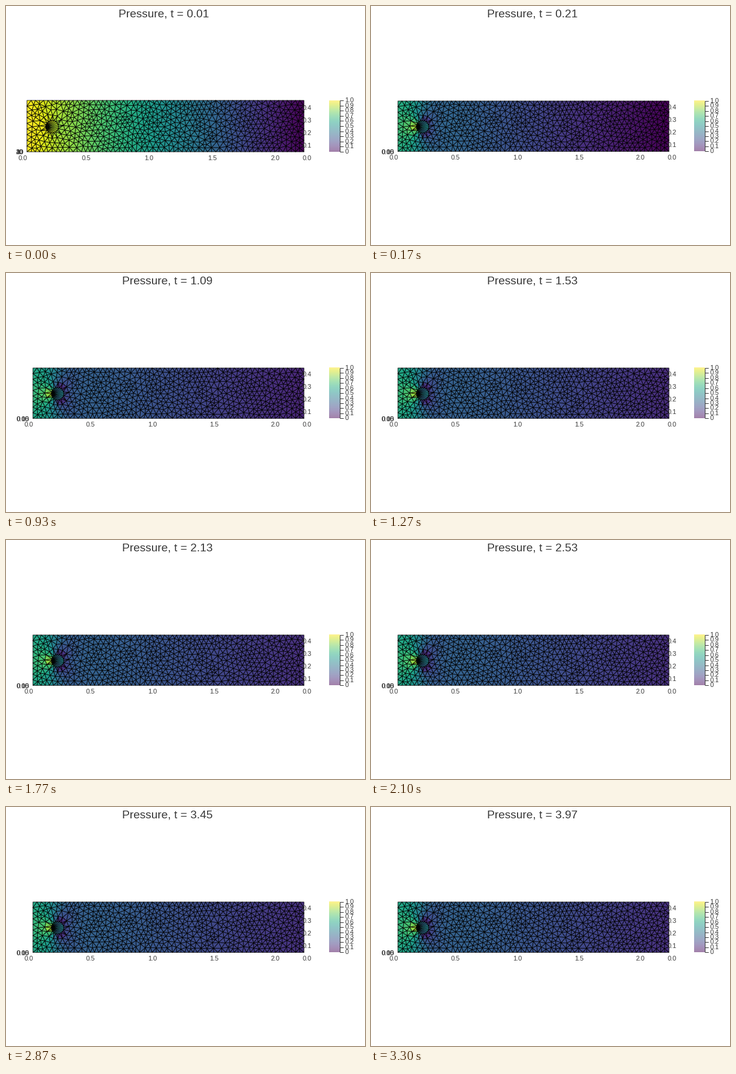
These frames come from a looping animation (600x400 px, 3330 ms). A matplotlib script:

```python
import numpy as np
import matplotlib.pyplot as plt
from matplotlib.animation import FuncAnimation
from matplotlib.collections import LineCollection, PolyCollection
from matplotlib.tri import Triangulation

W, H, DPI = 600, 400, 100
PX = 72 / DPI
FRAMES, LOOP_MS = 100, 3330
LENGTH, HEIGHT = 2.2, 0.41
CENTRE, RADIUS = np.array([0.2, 0.2]), 0.05
INK = "#383838"

plt.rcParams["font.family"] = "Liberation Sans"
viridis = plt.get_cmap("viridis")


def build_mesh(nx=66, ny=9, n_circle=20, gap=0.034, ring=0.042):
    """Unstructured channel mesh; the obstacle is closed by a fan of triangles."""
    rng = np.random.default_rng(4)
    angle = np.pi + 2 * np.pi * np.arange(n_circle) / n_circle
    circle = CENTRE + RADIUS * np.column_stack([np.cos(angle), np.sin(angle)])
    xs = np.linspace(0, LENGTH, nx + 1)
    ys = np.linspace(0, HEIGHT, ny + 1)[1:-1]
    border = np.concatenate([
        np.column_stack([xs, 0 * xs]),
        np.column_stack([xs, 0 * xs + HEIGHT]),
        np.column_stack([0 * ys, ys]),
        np.column_stack([0 * ys + LENGTH, ys]),
    ])
    fixed = np.concatenate([circle, border])

    # Dart throwing, then a little smoothing
    points = np.empty((9000, 2))
    count = len(fixed)
    points[:count] = fixed
    margin = 0.6 * gap
    darts = rng.uniform([margin, margin],
                        [LENGTH - margin, HEIGHT - margin], (8000, 2))
    for dart in darts:
        if np.hypot(*(dart - CENTRE)) < RADIUS + ring:
            continue
        offset = points[:count] - dart
        if np.min(np.einsum("ij,ij->i", offset, offset)) > (0.87 * gap) ** 2:
            points[count] = dart
            count += 1
    points = points[:count]

    for _ in range(3):
        edges = Triangulation(*points.T).edges
        total = np.zeros_like(points)
        degree = np.zeros(count)
        for a, b in (edges.T, edges.T[::-1]):
            np.add.at(total, a, points[b])
            np.add.at(degree, a, 1)
        moved = 0.4 * points + 0.6 * total / degree[:, None]
        reach = moved - CENTRE
        dist = np.hypot(*reach.T)
        near = dist < RADIUS + ring
        moved[near] = CENTRE + reach[near] / dist[near, None] * (RADIUS + ring)
        points[len(fixed):] = moved[len(fixed):]

    tris = Triangulation(*points.T).triangles
    tris = tris[(tris >= n_circle).any(axis=1)]
    fan = [(0, i, i + 1) for i in range(1, n_circle - 1)]
    return points, np.concatenate([tris, fan])


points, tris = build_mesh()
px, py = points.T
rel = points - CENTRE
dist = np.maximum(np.hypot(*rel.T), RADIUS)
cos = rel[:, 0] / dist
near = (RADIUS / dist) ** 1.3


def pressure(k):
    """Normalised pressure at the mesh points for step k."""
    if k == 0:
        p = 1 - px / LENGTH - 0.05 * near * cos
    else:
        decay = np.exp(-(0.04 * k - 0.2) / 0.5)
        left = 0.55 + 0.10 * decay
        mid = 0.31 + 0.08 * decay
        right = 0.09 - 0.12 * decay
        upstream = left - 0.1 * px
        downstream = mid + (right - mid) * (px - 0.3) / (LENGTH - 0.3)
        s = np.clip((px - 0.08) / 0.24, 0, 1)
        s = s * s * (3 - 2 * s)
        cos2 = 2 * cos ** 2 - 1
        p = upstream + (downstream - upstream) * s
        p += near * (-0.13 - 0.36 * cos + 0.27 * cos2)
    return (p - p.min()) / (p.max() - p.min())


fig = plt.figure(figsize=(W / DPI, H / DPI), dpi=DPI, facecolor="white")
ax = fig.add_axes([0, 0, 1, 1])
ax.axis("off")


def label(text="", size=10.9, **kw):
    kw.setdefault("va", "center")
    return ax.text(0, 0, text, fontsize=size * PX, color=INK, **kw)


bar = ax.imshow(np.linspace(1, 0, 256)[:, None], cmap=viridis, alpha=0.5,
                aspect="auto", interpolation="bilinear")
ax.set_xlim(0, W)
ax.set_ylim(H, 0)

mesh = PolyCollection([], edgecolors="black", linewidths=0.8 * PX)
bar_axis = LineCollection([], colors=INK, linewidths=PX)
for artist in (mesh, bar_axis):
    ax.add_collection(artist, autolim=False)

title = label(size=19.2, ha="center", va="baseline")
x_labels = [label(f"{0.5 * i:.1f}", ha="center") for i in range(5)]
y_labels = [label(f"{0.1 * i:.1f}", ha="left") for i in range(5)]
z_labels = [label(ha="right") for _ in range(5)]
bar_labels = [label(f"{0.1 * i:.1f}" if i else "0", ha="left")
              for i in range(11)]


def set_layout(first):
    """Place mesh, axes and labels; the first step has a wider plot box."""
    left, top, bottom = (35, 158, 244) if first else (45, 159, 243.3)
    right = 498
    sx = (right - left) / LENGTH
    sy = (bottom - top) / HEIGHT
    screen = np.column_stack([left + sx * px, bottom - sy * py])
    mesh.set_verts(screen[tris])

    for i, text in enumerate(x_labels):
        text.set_position((left - 6.4 + 0.5 * i * sx, bottom + 10.5))
    for i, text in enumerate(y_labels):
        text.set_position((496, bottom + 10.7 - 20.9 * i))
    # The plot is seen from above, so the height labels share one spot
    heights = (["0", "10", "20", "30", "40"] if first
               else ["0.00", "0.05", "0.10", "", ""])
    for text, value in zip(z_labels, heights):
        text.set_text(value)
        text.set_position((left - 6.7, bottom + 1.3))

    bar.set_extent((540, 558, bottom, top))
    ticks = np.linspace(bottom, top, 11)
    bar_axis.set_segments([[(558, top), (558, bottom)]]
                          + [[(558, y), (564, y)] for y in ticks])
    for text, y in zip(bar_labels, ticks):
        text.set_position((566.5, y))
    title.set_position((264 if first else 269.8, 18.5))


def draw(k):
    set_layout(k == 0)
    mesh.set_facecolor(viridis(pressure(k)[tris].mean(axis=1)))
    title.set_text(f"Pressure, t = {0.01 + 0.04 * k:.2f}")
    return [mesh, title]


anim = FuncAnimation(fig, draw, frames=FRAMES, interval=LOOP_MS / FRAMES,
                     init_func=lambda: draw(0), repeat=True, repeat_delay=0)
plt.show()
```
